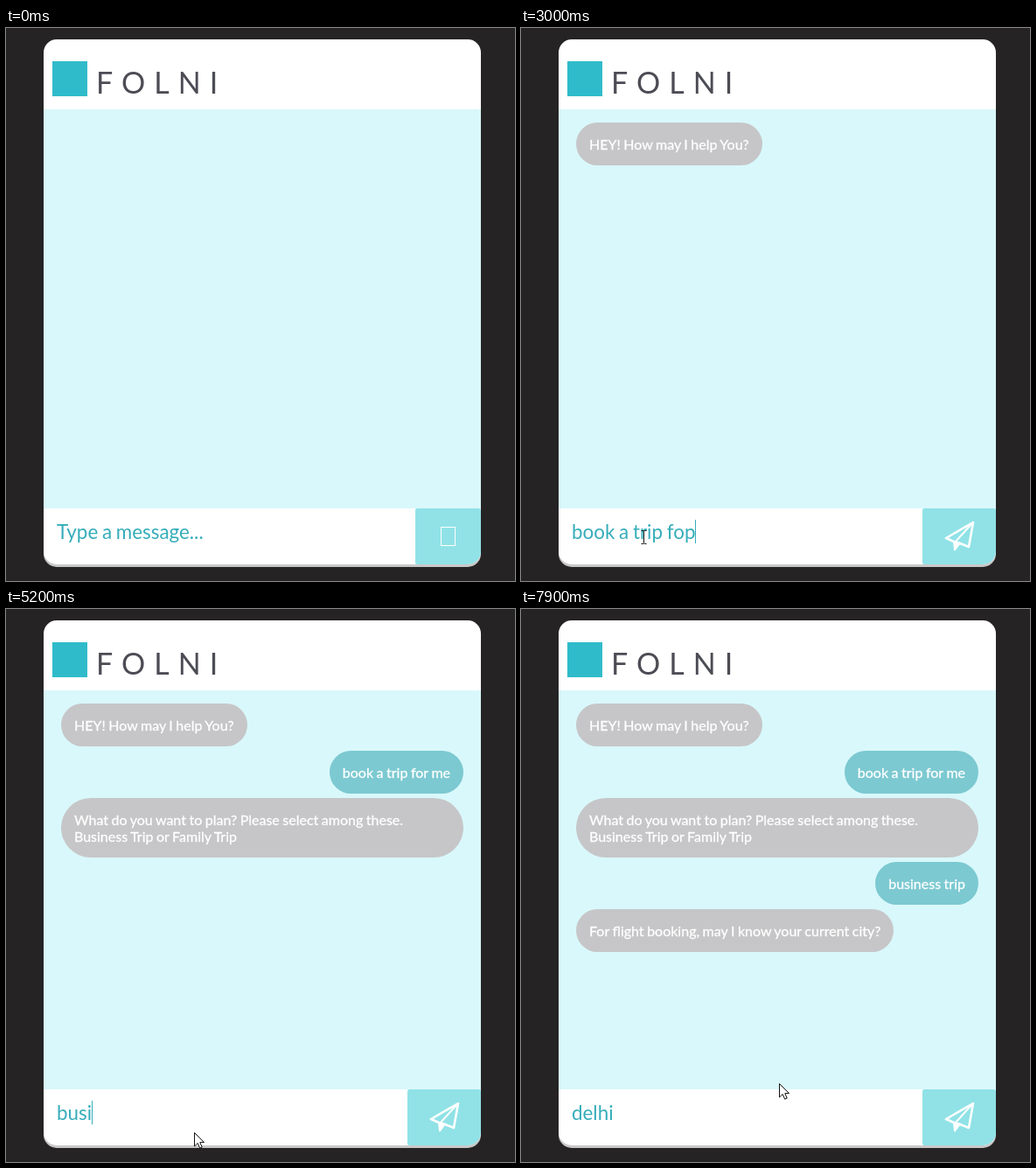
An HTML page that plays this animation: 582x632 px, repeating every 8000 ms.

```html
<!DOCTYPE html>
<html lang="en">
<head>
<meta charset="utf-8">
<title>Chat assistant</title>
<style>
  html, body { margin: 0; width: 100%; height: 100%; overflow: hidden; background: #252324; }
  body { position: relative; font: 16px/19px Lato, sans-serif; }
  .card {
    position: absolute; left: 43px; top: 13px; width: 500px; height: 600px;
    border-radius: 15px; background: #fff; box-shadow: 0 3px #c9c8c8; overflow: hidden;
  }
  .mark { position: absolute; left: 10px; top: 25px; width: 40px; height: 40px; background: #2fbbca; }
  .title {
    position: absolute; left: 60px; top: 28px;
    font-size: 34px; line-height: 41px; letter-spacing: 10px; color: #4c4c55;
  }
  .chat {
    position: absolute; top: 80px; width: 460px; height: 441px; padding: 15px 20px 0;
    display: flex; flex-direction: column; align-items: flex-start; gap: 5px;
    background: #d9f8fb; color: #fff;
    word-spacing: -.035em; -webkit-text-stroke: .3px #fff;
  }
  .bubble { box-sizing: border-box; max-width: 100%; padding: 15px; border-radius: 50px; background: #c6c6c8; }
  .user { align-self: flex-end; background: #7cc9d1; }
  .field {
    position: absolute; left: 15px; top: 549px; height: 27px; display: flex;
    font-size: 22.4px; line-height: 27px; white-space: pre; word-spacing: -.045em; color: #35adba;
  }
  .selected { background: #0078d7; color: #fff; }
  .caret { width: 1px; margin-right: -1px; background: #35adba; }
  .send { position: absolute; right: 0; top: 536px; width: 84px; height: 64px; border-radius: 2px; background: #90e2e6; }
  .send.loading { width: 75px; }
  .send.hover { background: #19b9d9; }
  .send svg { position: absolute; left: 0; top: 0; }
  .tofu { position: absolute; left: 29px; top: 21px; width: 15px; height: 20px; border: 1px solid #fff; }
  .send.loading svg, .send:not(.loading) .tofu { display: none; }
  .pointer { position: absolute; left: 0; top: 0; overflow: visible; }
</style>
</head>
<body>
<div class="card">
  <div class="mark"></div>
  <div class="title">FOLNI</div>
  <div class="chat">
    <div class="bubble">HEY! How may I help You?</div>
    <div class="bubble user">book a trip for me</div>
    <div class="bubble">What do you want to plan? Please select among these. Business Trip or Family Trip</div>
    <div class="bubble user">business trip</div>
    <div class="bubble">For flight booking, may I know your current city?</div>
  </div>
  <div class="field"><span class="text"></span><span class="caret"></span></div>
  <div class="send">
    <span class="tofu"></span>
    <svg width="84" height="64" fill="none" stroke="#fff" stroke-width="2.6" stroke-linejoin="round">
      <path d="M36 38 27 34 58 16 53 44 43 40"/>
      <path d="M37 39 57 17" stroke-width="2"/>
      <path d="M36 38 43 39.5 37 47.5Z" fill="#fff" stroke-width="2"/>
    </svg>
  </div>
</div>
<svg class="pointer" width="1" height="1" stroke="#111" stroke-width="1" stroke-linejoin="round">
  <path data-kind="arrow" fill="#fff" d="M.5 .5V16L4.2 12.5 6.7 18.2 9.2 17.1 6.8 11.6H11.5Z"/>
  <path data-kind="text" fill="none" d="M-3-7.5H-1Q0-7.5 0-6.5Q0-7.5 1-7.5H3M0-6.5V6.5M-3 7.5H-1Q0 7.5 0 6.5Q0 7.5 1 7.5H3"/>
  <path data-kind="hand" fill="#fff" d="M-1.5 14V1.5a1.8 1.8 0 0 1 3.6 0V8q3-1 3.5 1q3-.8 3.3 1q2.6-.3 2.6 2v5q-.5 4-2.5 6H-.5q-1-3-5-8q-1.5-3 1-3zM2.1 8v4M5.6 9v3M8.9 10v3"/>
</svg>
<script>
const LOOP = 8000;
const FADE = 150;
const loadedAt = 200;
const bubbleTimes = [350, 3780, 4300, 5940, 6250];

// start, text already there, text typed, ms per key
const typing = [
  [0, "", "", 1],
  [1100, "", "book A", 170],
  [2200, "book ", "", 1],
  [2300, "book ", "a trip fop", 70],
  [3050, "book a trip fo", "", 1],
  [3130, "book a trip fo", "r me", 80],
  [4900, "", "busi", 90],
  [5260, "busi", "ness trip", 55],
  [7200, "", "delhi", 110]
];
const caretSpans = [[1000, 3750], [4500, 4700], [4900, 5900], [7200, 7800]];
const selectSpans = [[4700, 4900], [7030, 7200]];

// time, x, y, pointer shape until the next entry
const path = [
  [800, 330, 626, "arrow"],
  [920, 260, 600, "text"],
  [1100, 140, 582, "text"],
  [3400, 140, 582, "text"],
  [3560, 380, 592, "arrow"],
  [3680, 470, 589, "hand"],
  [3760, 504, 587, "hand"],
  [4150, 504, 587, "hand"],
  [4250, 455, 588, "text"],
  [4500, 235, 578, "text"],
  [4850, 225, 580, "text"],
  [4950, 222, 592, "arrow"],
  [5100, 215, 598, "arrow"],
  [5680, 215, 598, "arrow"],
  [5800, 470, 592, "hand"],
  [5870, 504, 587, "hand"],
  [6100, 504, 587, "hand"],
  [6180, 450, 584, "text"],
  [6400, 220, 578, "text"],
  [7650, 220, 578, "text"],
  [7760, 250, 562, "arrow"],
  [7880, 295, 542, "arrow"]
];

const $ = selector => document.querySelector(selector);
const bubbles = [...document.querySelectorAll(".bubble")];
const shapes = [...document.querySelectorAll("[data-kind]")];
const text = $(".text"), caret = $(".caret"), send = $(".send"), pointer = $(".pointer");

const within = (spans, t) => spans.some(([from, to]) => t >= from && t < to);
const clamp = v => Math.min(1, Math.max(0, v));

function typedAt(t) {
  const [start, base, keys, step] = typing.findLast(run => run[0] <= t);
  return base + keys.slice(0, Math.floor((t - start) / step) + 1);
}

function pointerAt(t) {
  const i = path.findLastIndex(key => key[0] <= t);
  if (i < 0) return null;
  const [t0, x0, y0, kind] = path[i];
  const [t1, x1, y1] = path[i + 1] || [t0 + 1, x0, y0];
  const p = clamp((t - t0) / (t1 - t0));
  return { x: Math.round(x0 + (x1 - x0) * p), y: Math.round(y0 + (y1 - y0) * p), kind };
}

// The previous message stays in the field until the next one replaces it.
function draw(t) {
  bubbles.forEach((bubble, i) => bubble.style.opacity = clamp((t - bubbleTimes[i]) / FADE));

  const typed = typedAt(t);
  text.textContent = typed || "Type a message...";
  text.classList.toggle("selected", within(selectSpans, t));
  caret.style.visibility = within(caretSpans, t) ? "visible" : "hidden";
  caret.style.order = typed ? 0 : -1;

  const cursor = pointerAt(t);
  pointer.style.display = cursor ? "block" : "none";
  if (cursor) {
    const half = cursor.kind === "text" ? 0.5 : 0;
    pointer.style.transform = `translate(${cursor.x + half}px, ${cursor.y}px)`;
    shapes.forEach(s => s.style.display = s.dataset.kind === cursor.kind ? "inline" : "none");
  }
  send.classList.toggle("loading", t < loadedAt);
  send.classList.toggle("hover", cursor?.kind === "hand");
}

const begin = performance.now();
function tick() {
  draw((performance.now() - begin) % LOOP);
  requestAnimationFrame(tick);
}
tick();
</script>
</body>
</html>
```
